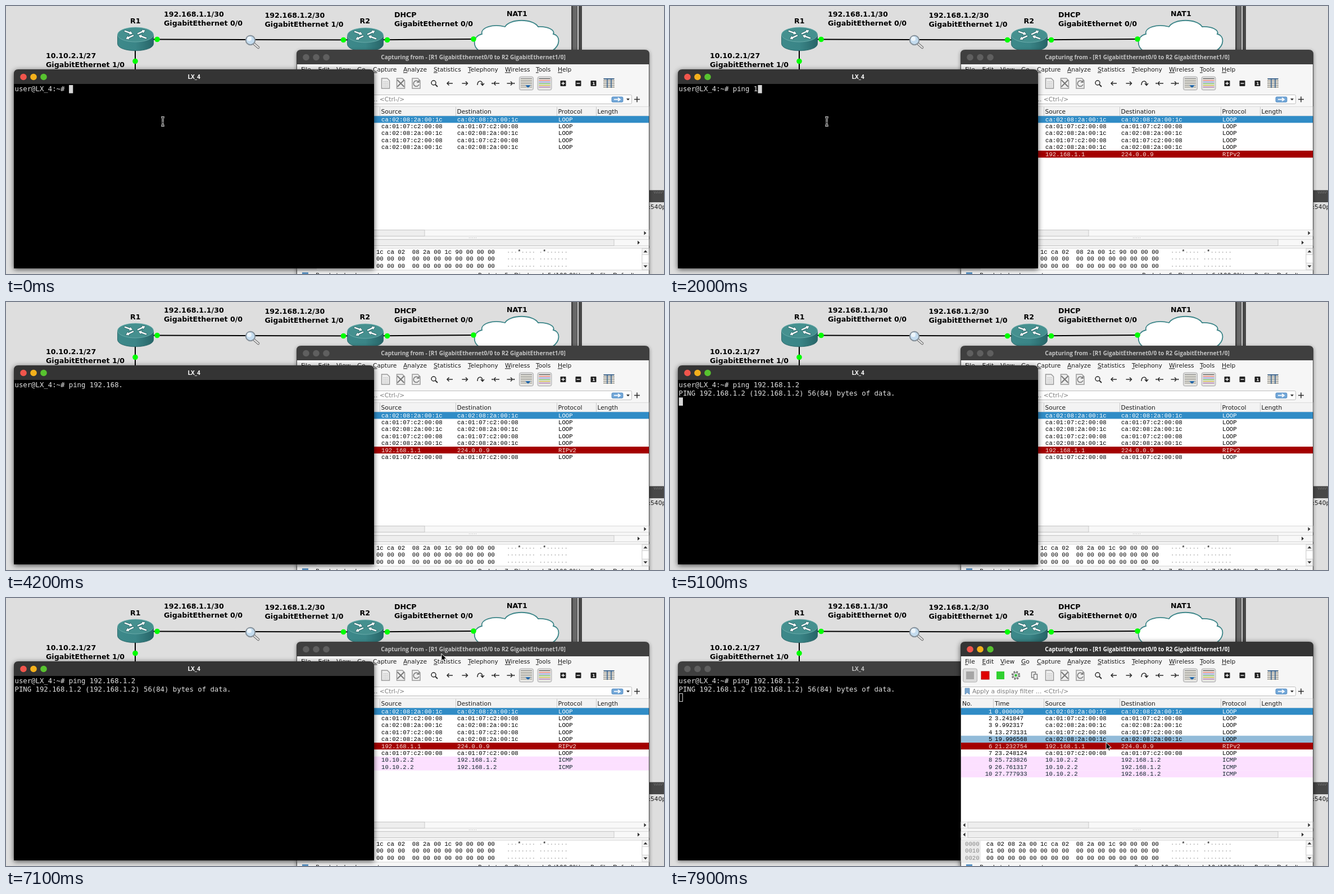
Animation, 1171 px wide and 478 px high, one loop 8000 ms. Source, as an HTML page:

```html
<!DOCTYPE html>
<html lang="en">
<head>
<meta charset="utf-8">
<title>Ping capture</title>
<style>
html, body { margin: 0; width: 100%; height: 100%; overflow: hidden; background: #dedede; }
svg { display: block; }
text { white-space: pre; }
.label { font: bold 12.62px "DejaVu Sans", sans-serif; }
.ui { font: 10.67px "DejaVu Sans", sans-serif; fill: #1c1c1c; }
.mono { font: 10.67px "Liberation Mono", monospace; }
.term { font: 12.3px "DejaVu Sans Mono", monospace; fill: #e2e2e2; }
.title { font: bold 10.06px "Open Sans", sans-serif; fill: #c4c4c4; text-anchor: middle; }
.bar { fill: #3f3f3f; }
.btn { fill: #5f5f5f; }
.win { filter: drop-shadow(0 2px 3px #0007); }
.win.on { filter: drop-shadow(0 2px 5px #000a); }
.on .bar { fill: #343434; }
.on .title { fill: #fff; }
.on .btn { fill: var(--c); }
.u { text-decoration: underline; }
.ic { fill: none; stroke: #2b2b2b; stroke-width: 1.5; }
.dim { fill: #eee; stroke: #999; }
</style>
</head>
<body>
<svg id="stage" width="1171" height="478" viewBox="0 0 1171 478"></svg>
<script>
const LOOP = 8000;
const STEP = 100;
const HOST = 'LX_4';
const PROMPT = `user@${HOST}:~# `;
const COMMAND = 'ping 192.168.1.2';
const CELL = 7.405;

const esc = s => String(s).replace(/&/g, '&amp;').replace(/</g, '&lt;');
const text = (x, y, s, cls, more = '') => `<text x="${x}" y="${y}" class="${cls}" ${more}>${esc(s)}</text>`;
const rect = (x, y, w, h, fill, more = '') => `<rect x="${x}" y="${y}" width="${w}" height="${h}" fill="${fill}" ${more}/>`;
const path = (d, more = 'class="ic"') => `<path d="${d}" ${more}/>`;
const at = (x, y, s) => `<g transform="translate(${x} ${y})">${s}</g>`;
const dot = (x, y, r, fill, more = '') => `<circle cx="${x}" cy="${y}" r="${r}" fill="${fill}" ${more}/>`;

// ---- network map behind the windows ----
const arrow = 'M-2 -1.6H8V-4L14 0L8 4V1.6H-2Z';
const router = (x, y) => at(x, y,
  path('M-32 0V16C-32 33 32 33 32 16V0Z', 'fill="url(#teal)" stroke="#1f5c5f" stroke-width=".8"') +
  '<ellipse rx="32" ry="13" fill="#45908f" stroke="#73b2b0" stroke-width=".8"/>' +
  [[5, -2, -25], [-5, 2, 155], [-18, -6, 20], [18, 6, 200]].map(([a, b, turn]) =>
    path(arrow, `transform="translate(${a} ${b}) rotate(${turn})" fill="#fff" stroke="#1f5c5f" stroke-width=".7"`)).join(''));

const labels = [
  [281, 19, '192.168.1.1/30'], [281, 35.4, 'GigabitEthernet 0/0'],
  [460.5, 20.6, '192.168.1.2/30'], [460.5, 37, 'GigabitEthernet 1/0'],
  [691, 19.6, 'DHCP'], [691, 36, 'GigabitEthernet 0/0'],
  [71, 93, '10.10.2.1/27'], [71, 109.4, 'GigabitEthernet 1/0'],
  [221, 30.6, 'R1'], [629.5, 31, 'R2'], [891, 17.6, 'NAT1']
];

const map = () =>
  rect(0, 0, 1171, 478, '#dedede') +
  rect(1006, 0, 19, 478, '#474747') + rect(1009, 0, 7, 478, '#686868') + rect(1017, 0, 2, 478, '#d0d0d0') +
  rect(1025, 328.5, 146, 21.5, '#474747') +
  path('M1153 331.5H1169M1154 333.5H1169', 'stroke="#999" stroke-dasharray="1 2"') +
  text(1143.5, 362, ':540p', 'ui') +
  path('M230 59.5L640 60.5L840 59M230 60V120', 'fill="none" stroke="#000" stroke-width="2"') +
  path('M843 80C830 74 830 54 847 50C844 39 866 31 888 37C897 22 938 22 947 37C964 36 978 43 974 50C987 53 987 70 972 80Z',
    'fill="#fff" stroke="#3c8588" stroke-width="1.8"') +
  router(230.5, 51) + router(639.5, 52) +
  [[269, 59.5], [600.5, 60.5], [678.5, 60.5], [832, 59], [230, 98.5]].map(([x, y]) => dot(x, y, 4.8, '#0f0')).join('') +
  path('M441 67L449 74', 'stroke="#777" stroke-width="4.5" stroke-linecap="round"') +
  path('M441 67L449 74', 'stroke="#eee" stroke-width="2.2" stroke-linecap="round"') +
  dot(435, 61, 8.2, '#c4dcef', 'stroke="#86919a" stroke-width="2"') + dot(433, 58.5, 4, '#edf5fb') +
  labels.map(l => text(...l, 'label')).join('');

// ---- windows ----
const titleBar = (x, y, w, h, name, mid) =>
  path(`M${x} ${y + h}V${y + 8}Q${x} ${y} ${x + 8} ${y}H${x + w - 8}Q${x + w} ${y} ${x + w} ${y + 8}V${y + h}Z`, 'class="bar"') +
  ['#f0554c', '#f3b01c', '#57c22f'].map((c, i) =>
    dot(x + 17 + 18 * i, y + 13.5, 5.8, '', `class="btn" style="--c:${c}"`)).join('') +
  text(mid, y + 17, name, 'title');

const terminal = () =>
  titleBar(14, 113, 641, 27, HOST, 334.5) + rect(14, 139, 641, 329, '#000') +
  '<text id="line" class="term" x="15.5" y="152.3"></text>' +
  text(15.5, 167, 'PING 192.168.1.2 (192.168.1.2) 56(84) bytes of data.', 'term', 'id="reply"') +
  rect(0, 0, 7, 14.5, '#d6d6d6', 'id="block"');

const menus = [[525, 'File'], [555.5, 'Edit'], [588, 'View'], [625, 'Go'], [653, 'Capture'], [707, 'Analyze'],
  [761, 'Statistics'], [822, 'Telephony'], [888, 'Wireless'], [943, 'Tools'], [982, 'Help']];
const menu = ([x, s]) => `<text x="${x}" y="117.3" class="ui"><tspan class="u">${s[0]}</tspan>${s.slice(1)}</text>`;

const page = path('M-7 -9H3L7 -5V9H-7Z', 'class="ic dim"');
const right = 'M-5 0H5M1.5 -3.5L5 0L1.5 3.5';
const left = 'M5 0H-5M-1.5 -3.5L-5 0L-1.5 3.5';
const pressed = rect(-12.5, -12, 25, 24, '#dcdcdc', 'rx="3" stroke="#b0b0b0"');
const lines = c => rect(-10, -9, 20, 18, '#f4f2e8') + c.map((ink, i) => rect(-10, -9 + i * 3, 20, 1.1, ink)).join('');
const gray = Array(6).fill('#777');
const boxed = s => rect(-5, -5, 10, 10, '#222', 'rx="1"') + s;
const plus = 'M-3 0H3M0 -3V3';
const white = 'stroke="#fff" stroke-width="1.4"';
const tools = [
  [534, pressed + rect(-7, -7, 14, 14, '#a6a6a6')],
  [561, rect(-7, -7, 14, 14, '#df0000', 'stroke="#b40000"')],
  [588, rect(-7, -7, 14, 14, '#2fd02f')],
  [615.5, dot(0, 0, 6.3, 'none', 'stroke="#777" stroke-width="3" stroke-dasharray="2.8 2.15"') +
    dot(0, 0, 5, '#ddd', 'stroke="#777"') + dot(0, 0, 2.2, '#2fbf2f')],
  [648.5, path('M-5 -6H2V-3M-5 -6V4H-2M-1 -2H5V7H-1Z', 'class="ic" style="stroke:#777"')],
  [675.5, page + path('M-4 -3H4M-4 0H4M-4 3H4M-4 6H4', 'stroke="#aaa" stroke-dasharray="2 1"')],
  [702.5, page + path('M-6 -6L6 6M6 -6L-6 6', 'stroke="#777" stroke-width="2"')],
  [730, page + path('M4 -3A5 5 0 1 0 5 2M5 -6V-2H1', 'class="ic" style="stroke:#777"')],
  [762, dot(-1, -1, 4, 'none', 'class="ic"') + path('M2 2L6 6', 'stroke="#2b2b2b" stroke-width="2"')],
  [790, path(left)], [816.5, path(right)],
  [844, path('M-5 3C-5 -6 4 -6 4 2M1 0L4 3.5L7 0')],
  [871.5, path(left, 'class="ic" transform="translate(1.5 0)"') + dot(-6, 0, 1.2, '#222')],
  [898, path(right, 'class="ic" transform="translate(-1.5 0)"') + dot(6, 0, 1.2, '#222')],
  [926, pressed + lines(gray) + path('M-2 3H8L3 8Z', 'fill="#2467a8"')],
  [958.5, pressed + lines(['#444', '#d55', '#56c', '#4a4', '#b8a020', '#849'])],
  [991.5, boxed(path(plus, white))],
  [1018.5, boxed(path('M-3 0H3', white))],
  [1045.5, boxed(text(-2.2, 2.8, '1', 'ui', 'style="fill:#fff;font-size:7.5px;font-weight:bold"'))],
  [1073, lines(gray) + path('M-9 -8H9M-3 -9V8M4 -9V8', 'stroke="#27588a" stroke-width="1.4"')]
];

const tri = (x, y, turn) => path('M-2 -3.5L2 0L-2 3.5Z', `fill="#333" transform="translate(${x} ${y}) rotate(${turn})"`);
const hScroll = (y, thumbEnd, endX) =>
  rect(518, y, 626, 11, '#f8f8f8', 'stroke="#d0d0d0" stroke-width=".8"') +
  rect(530, y, thumbEnd - 530, 11, '#eeeeee', 'stroke="#bebebe" stroke-width=".8"') +
  tri(523.5, y + 5.5, 180) + tri(endX, y + 5.5, 0);

const zeros = '00 00 00 00 00 00 00 00  00 00 00 00 00 00 00 00';
const dump = [
  ['0000', 'ca 02 08 2a 00 1c ca 02  08 2a 00 1c 90 00 00 00', '···*···· ·*······'],
  ['0010', '01' + zeros.slice(2), '········ ········'],
  ['0020', zeros, '········ ········']
];

const R1 = 'ca:01:07:c2:00:08', R2 = 'ca:02:08:2a:00:1c', PC = '10.10.2.2', DEST = '192.168.1.2';
const packets = [
  [0, '0.000000', R2, R2, 'LOOP'], [0, '3.241847', R1, R1, 'LOOP'], [0, '9.992317', R2, R2, 'LOOP'],
  [0, '13.273131', R1, R1, 'LOOP'], [0, '19.996568', R2, R2, 'LOOP'],
  [1000, '21.232754', '192.168.1.1', '224.0.0.9', 'RIPv2'], [3000, '23.248124', R1, R1, 'LOOP'],
  [5400, '25.723826', PC, DEST, 'ICMP'], [6400, '26.761317', PC, DEST, 'ICMP'], [7400, '27.777933', PC, DEST, 'ICMP']
];
const ROW = 12.36, TOP = 196.2, HOVER = '#92bbd9';
const look = { LOOP: ['#fff', '#000'], RIPv2: ['#a40000', '#f4ded8'], ICMP: ['#fce0ff', '#12272e'] };
const colors = i => i ? look[packets[i][4]] : ['#308cc6', '#fff'];
const packetRow = ([, time, src, dst, proto], i) => {
  const [back, ink] = colors(i);
  const y = TOP + i * ROW;
  const cell = (x, s, more = '') => text(x, y + 9.5, s, 'mono', `fill="${ink}" ${more}`);
  return `<g class="packet">${rect(518, y, 626, ROW + .1, back)}` +
    cell(573.5, i + 1, 'text-anchor="end"') + cell(578, time) + cell(668, src) + cell(803, dst) + cell(983, proto) + '</g>';
};

const capture = () =>
  titleBar(517, 78, 628, 27, 'Capturing from - [R1 GigabitEthernet0/0 to R2 GigabitEthernet1/0]', 831.5) +
  rect(517, 104, 628, 380, '#4a4a4a') + rect(518, 104, 626, 380, '#f6f6f6') + menus.map(menu).join('') +
  tools.map(([x, s]) => at(x, 138, s)).join('') +
  rect(518.5, 158.5, 595, 16, '#fff', 'rx="2" stroke="#bdbdbd"') +
  path('M525 161H533V172L529 168.5L525 172Z', 'fill="#7aa6d0" stroke="#4d7fae" stroke-width=".7"') +
  text(538, 170.3, 'Apply a display filter … <Ctrl-/>', 'ui', 'style="fill:#7d7d7d"') +
  rect(539, 160, 1, 13, '#000', 'id="caret"') +
  rect(1078, 162, 20, 9.5, '#72a7d8', 'rx="2" stroke="#4a82b8" stroke-width=".8"') +
  path('M1082 166.7H1092M1089 163.8L1093 166.7L1089 169.6', 'fill="none" stroke="#fff" stroke-width="1.7"') +
  path('M1104 165H1110L1107 168.5Z', 'fill="#333"') +
  path('M1118 166.5H1128M1123 161.5V171.5') +
  rect(518, 180, 626, 220, '#fff') + rect(518, 179.5, 626, 16.5, '#f3f3f3', 'stroke="#d2d2d2" stroke-width=".7"') +
  [[520, 'No.'], [578, 'Time'], [667.5, 'Source'], [802.5, 'Destination'], [982.5, 'Protocol'], [1052.5, 'Length']]
    .map(([x, s]) => text(x, 192, s, 'ui')).join('') +
  path('M575.5 180V196M665.5 180V196M800.5 180V196M980.5 180V196M1050.5 180V196', 'stroke="#c8c8c8"') +
  packets.map(packetRow).join('') +
  hScroll(399.5, 745, 1137.5) +
  path('M824 413.5H838', 'stroke="#aaa" stroke-dasharray="1 2"') + hScroll(416.5, 1082, 1126) +
  rect(518, 432, 626, 39, '#fff', 'stroke="#c8c8c8" stroke-width=".8"') + rect(518, 432.5, 35, 38, '#ebebeb') +
  dump.map(([off, hex, chars], i) => {
    const y = 442 + i * 12.4;
    return text(525, y, off, 'mono', 'fill="#888"') + text(563, y, hex, 'mono') +
      [...chars].map((c, k) => text(891 + k * 6.4, y, c, 'mono', `fill="${c === '*' ? '#000' : '#999'}"`)).join('');
  }).join('') +
  rect(1132, 432.5, 12, 38, '#f3f3f3', 'stroke="#c8c8c8" stroke-width=".8"') +
  rect(1132, 443.5, 12, 15, '#fff', 'stroke="#c8c8c8" stroke-width=".8"') +
  tri(1138, 437.5, -90) + tri(1138, 464.5, 90) +
  rect(527, 475, 11, 8, '#5b93c4') +
  text(551, 483.5, 'Ready to load or capture', 'ui') +
  '<text id="status" class="ui" x="1023" y="483.5" text-anchor="end"></text>' +
  text(1040, 483.5, 'Profile: Default', 'ui');

// ---- pointers, each with its hot spot at 0,0 ----
const ibeam = 'M-3 -7.5H-1L0 -6.5L1 -7.5H3M0 -6.5V6.5M-3 7.5H-1L0 6.5L1 7.5H3M-1.5 1.5H1.5';
const pointers = {
  ibeam: path(ibeam, 'fill="none" stroke="#e6e6e6" stroke-width="3.2"') + path(ibeam, 'fill="none" stroke="#111" stroke-width="1.2"'),
  arrow: path('M0 0V13L3 10.3L5 15L7.3 14L5.3 9.4H9.2Z', 'fill="#000" stroke="#fff" stroke-width="1"'),
  move: path('M0 -8L3.5 -4H1.2V-1.2H4V-3.5L8 0L4 3.5V1.2H1.2V4H3.5L0 8L-3.5 4H-1.2V1.2H-4V3.5L-8 0L-4 -3.5V-1.2H-1.2V-4H-3.5Z',
    'fill="#000" stroke="#fff" stroke-width="1"')
};

const stage = document.getElementById('stage');
stage.innerHTML =
  '<defs><linearGradient id="teal"><stop stop-color="#3d898a"/><stop offset=".5" stop-color="#3a8587"/>' +
  '<stop offset="1" stop-color="#276568"/></linearGradient></defs>' + map() +
  `<g id="wins"><g id="cap" class="win">${capture()}</g><g id="term" class="win">${terminal()}</g></g>` +
  Object.entries(pointers).map(([k, s]) => `<g id="${k}">${s}</g>`).join('');

const $ = id => document.getElementById(id);
const show = (el, on) => el.setAttribute('visibility', on ? 'visible' : 'hidden');
const set = (el, attrs) => Object.entries(attrs).forEach(([k, v]) => el.setAttribute(k, v));
const rows = [...document.querySelectorAll('.packet')];

// ---- timeline ----
const keys = [700, 1000, 1300, 1400, 1700, 2000, 2200, 2400, 3000, 3000, 3000, 3300, 3600, 4300, 4500, 4700];
const ENTER = 5100, FOCUS = 7300, BLINK = 600, CARET = 500;
const HIDE = 3000, WAKE = 6200;
// pointer way points: [ms, x, y]
const way = [[0, 279, 206], [WAKE, 280, 207], [6300, 290.5, 216], [7200, 790, 95.5], [7500, 790, 95.5], [7900, 776, 257.5]];
const ease = s => (1 - Math.cos(Math.PI * s)) / 2;

function pointerAt(t) {
  const next = way.findIndex(p => p[0] > t);
  if (next < 0) return way[way.length - 1].slice(1);
  const [t0, x0, y0] = way[next - 1], [t1, x1, y1] = way[next];
  const k = t < WAKE ? 0 : ease((t - t0) / (t1 - t0));
  return [x0 + (x1 - x0) * k, y0 + (y1 - y0) * k];
}

function pointerKind(t, x, y) {
  if (t >= HIDE && t < WAKE) return '';
  if (t >= FOCUS && t < FOCUS + STEP) return 'move';
  return x < 655 && y > 140 ? 'ibeam' : 'arrow';
}

function drawTerminal(t, focused) {
  const typed = keys.filter(k => k <= t).length;
  const entered = t >= ENTER;
  const last = entered ? ENTER : typed ? keys[typed - 1] : -200;
  $('line').textContent = PROMPT + COMMAND.slice(0, typed);
  show($('reply'), entered);
  const block = $('block');
  const col = entered ? 0 : PROMPT.length + typed;
  show(block, !focused || (t - last) % (2 * BLINK) < BLINK);
  set(block, focused
    ? { x: 15.8 + col * CELL, y: entered ? 170.3 : 141, width: 7.2, height: 14.6, fill: '#d6d6d6', stroke: 'none' }
    : { x: 16.5, y: 170.5, width: 6, height: 14, fill: 'none', stroke: '#d6d6d6' });
}

function drawPointer(t) {
  const [x, y] = pointerAt(t);
  const kind = pointerKind(t, x, y);
  for (const k in pointers) show($(k), k === kind);
  if (kind) $(kind).setAttribute('transform', `translate(${x} ${y})`);
  const over = t >= FOCUS ? Math.floor((y - TOP) / ROW) : -1;
  rows.forEach((r, i) => r.firstChild.setAttribute('fill', i && i === over ? HOVER : colors(i)[0]));
}

function render(t) {
  const front = t < FOCUS ? 'term' : 'cap';
  if ($('wins').lastChild.id !== front) $('wins').append($(front));
  for (const id of ['term', 'cap']) $(id).classList.toggle('on', id === front);
  const count = packets.filter(p => p[0] <= t).length;
  rows.forEach((r, i) => show(r, i < count));
  $('status').textContent = `Packets: ${count} · Displayed: ${count} (100.0%)`;
  show($('caret'), t >= FOCUS && t < FOCUS + CARET);
  drawTerminal(t, front === 'term');
  drawPointer(t);
}

const start = performance.now();
function tick(now) {
  const t = Math.max(0, now - start) % LOOP;
  render(Math.floor(t / STEP) * STEP);
  requestAnimationFrame(tick);
}
render(0);
requestAnimationFrame(tick);
</script>
</body>
</html>
```
